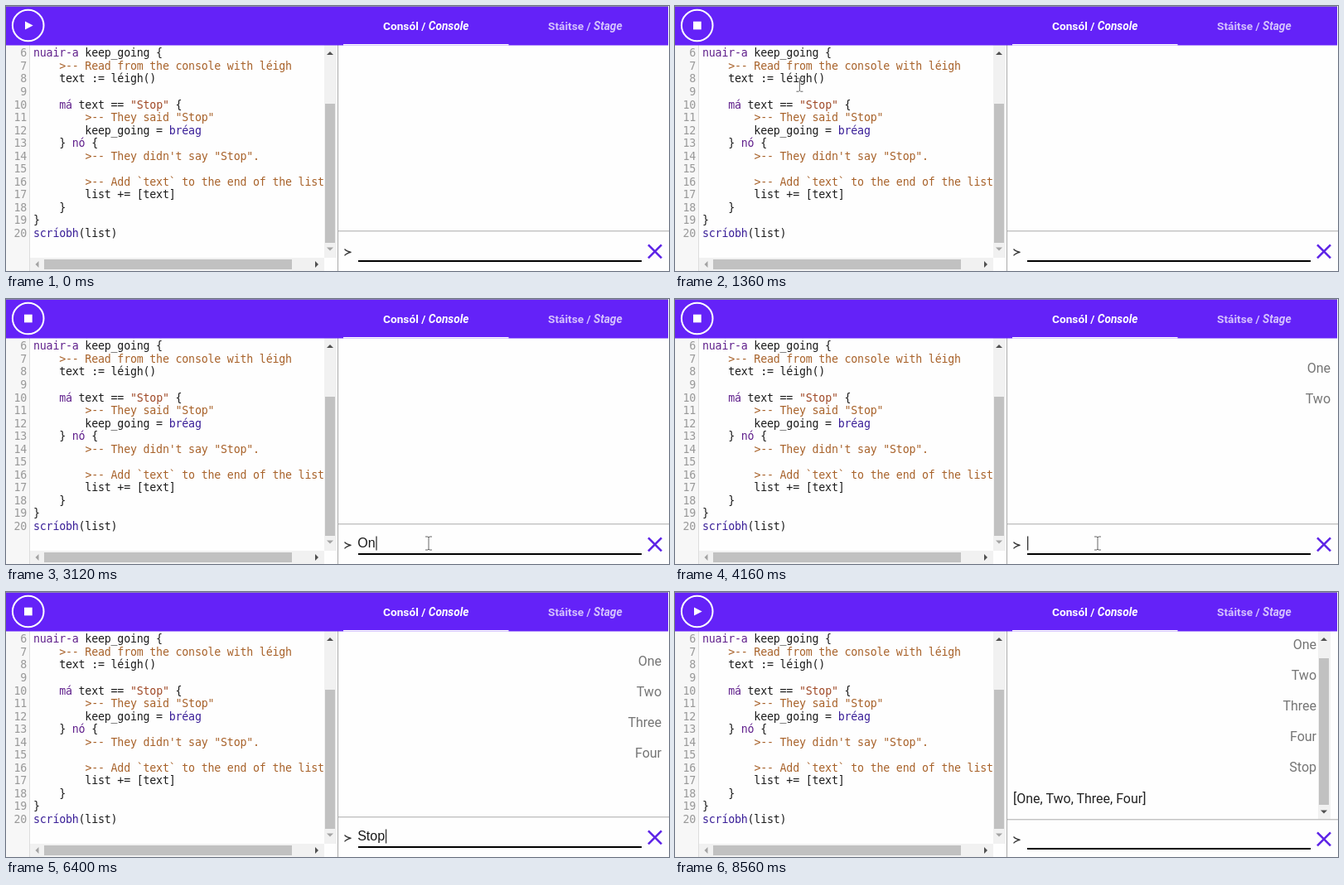
An HTML page that plays this animation: 800 px wide and 320 px high, repeating every 8720 ms.

```html
<!DOCTYPE html>
<html lang="ga">
<head>
<meta charset="utf-8">
<title>Consól</title>
<style>
  html, body { margin: 0; width: 100%; height: 100%; overflow: hidden; background: #fefefe; }
  svg { display: block; width: 800px; height: 320px; }
  text { white-space: pre; }
  .code { font: 13.3px "DejaVu Sans Mono", monospace; letter-spacing: -.21px; fill: #1c1c1c; }
  .num { fill: #999; text-anchor: end; }
  .key { fill: #60208c; }
  .com { fill: #a8622a; }
  .str { fill: #a04a28; }
  .atom { fill: #3a1f98; }
  .tab { font: 700 13.7px Roboto, sans-serif; fill: #fff; text-anchor: middle; }
  .log { font: 16px Roboto, sans-serif; fill: #757575; text-anchor: end; }
  .result { fill: #222; text-anchor: start; }
  .input { font: 16px "Liberation Sans", Arial, sans-serif; fill: #1a1a1a; }
  .track { fill: #f1f1f1; }
  .thumb { fill: #c1c1c1; }
  .dark { fill: #505050; }
  .pale { fill: #a3a3a3; }
  .italic { font-style: italic; }
  #pointer { filter: drop-shadow(0 0 1px #fff); stroke-linejoin: round; }
</style>
</head>
<body>
<svg viewBox="0 0 800 320">
  <defs>
    <clipPath id="codeArea"><rect y="47.500" width="384.500" height="256.500"/></clipPath>
    <clipPath id="logArea"><rect x="401" y="47.500" width="399" height="226.500"/></clipPath>
  </defs>
  <rect width="800" height="320" fill="#fefefe"/>

  <rect y="47" width="28" height="273" fill="#f7f7f7"/>
  <rect x="28" y="47" width="1" height="273" fill="#ddd"/>
  <g id="code" class="code" clip-path="url(#codeArea)"></g>

  <rect class="track" x="384" y="47" width="15" height="257"/>
  <rect class="thumb" x="385" y="118" width="12" height="168"/>
  <path class="dark" d="M387 59h8l-4-4z"/>
  <path class="pale" d="M387 291.500h8l-4 4z"/>
  <rect class="track" x="29" y="304" width="355" height="16"/>
  <rect class="thumb" x="46" y="306" width="299" height="12"/>
  <path class="pale" d="M39.500 308v8l-4-4z"/>
  <path class="dark" d="M373 308v8l4-4z"/>
  <rect x="400" y="47" width="1" height="273" fill="#aaa"/>

  <g id="log" clip-path="url(#logArea)"></g>
  <g id="logBar">
    <rect class="track" x="776" y="47" width="15" height="227"/>
    <rect class="thumb" x="777" y="80" width="12" height="177"/>
    <path class="dark" d="M779 59h8l-4-4z"/>
    <path class="dark" d="M779 263.500h8l-4 4z"/>
  </g>

  <rect id="border" x="401" width="399" height="1" fill="#aaa"/>
  <g id="prompt">
    <path d="M408.500 293.500Q411 296.500 416.500 297.300Q411 298.200 408.500 301.300" fill="none" stroke="#333" stroke-width="1.200"/>
    <rect x="425" y="307" width="342" height="2" fill="#000"/>
    <text id="input" class="input" x="424.200" y="300"></text>
    <rect id="caret" y="286.500" width="1.300" height="17" fill="#333"/>
    <path d="M775 288.300l16 16m0-16l-16 16" stroke="#5c22e6" stroke-width="2.500"/>
  </g>

  <rect width="799" height="47.500" fill="#6422f8"/>
  <rect width="799" height="1" fill="#8c84b0"/>
  <rect x="407" y="46" width="199.500" height="1.500" fill="#fff"/>
  <circle cx="26.700" cy="23.500" r="18.800" fill="none" stroke="#fff" stroke-width="2"/>
  <path id="icon" fill="#fff"/>
  <text class="tab" x="506.700" y="28.700">Consól / <tspan class="italic">Console</tspan></text>
  <text class="tab" x="698.800" y="28.700" opacity=".72">Stáitse / <tspan class="italic">Stage</tspan></text>

  <path id="pointer"/>
</svg>
<script>
const LOOP = 8720, STEP = 80, BLINK = 560;
const RUN = 1120, FOCUS = 2000, FINISH = 6880, POINTER_OUT = 4960;

const $ = id => document.getElementById(id);
const tag = (cls, text) => `<tspan class="${cls}">${text.replace(/>/g, '&gt;')}</tspan>`;
const key = s => tag('key', s), com = s => tag('com', s);
const str = s => tag('str', s), atom = s => tag('atom', s);

const lines = [
  key('nuair-a') + ' keep_going {',
  '    ' + com('>-- Read from the console with léigh'),
  '    text := léigh()',
  '',
  '    ' + key('má') + ' text == ' + str('"Stop"') + ' {',
  '        ' + com('>-- They said "Stop"'),
  '        keep_going = ' + atom('bréag'),
  '    } ' + key('nó') + ' {',
  '        ' + com('>-- They didn\'t say "Stop".'),
  '',
  '        ' + com('>-- Add `text` to the end of the list'),
  '        list += [text]',
  '    }',
  '}',
  atom('scríobh') + '(list)'
];
$('code').innerHTML = lines.map((line, i) => {
  const y = 61.4 + i * 15.53;
  return `<text class="num" x="25" y="${y}">${i + 6}</text><text x="33" y="${y}">${line}</text>`;
}).join('');

// Each word: the times its letters appear, then the time it is entered.
const words = [
  { text: 'One', keys: [2960, 3120, 3280], enter: 3440 },
  { text: 'Two', keys: [3680, 3760, 3920], enter: 4160 },
  { text: 'Three', keys: [4240, 4400, 4480, 4560, 4640], enter: 4880 },
  { text: 'Four', keys: [5280, 5360, 5440, 5520], enter: 5760 },
  { text: 'Stop', keys: [6000, 6240, 6320, 6400], enter: 6800 }
];
const caretResets = [FOCUS, ...words.flatMap(w => [...w.keys, w.enter]), FINISH];

$('log').innerHTML = words.map(w => `<text class="log">${w.text}</text>`).join('') +
  '<text class="log result" x="408" y="254.500">[One, Two, Three, Four]</text>';
const logRows = [...$('log').children];

const path = [
  [560, 120, 170], [880, 40, 47.5], [960, 30, 30], [RUN, 27, 26],
  [1840, 503, 293], [2160, 503, 293], [2320, 510, 295]
];
const shapes = {
  beam: 'M-4-8h3l1 1 1-1h3M0-7V7M-4 8h3l1-1 1 1h3',
  arrow: 'M0 0v15l3.500-3.300 2.500 5.500 2.400-1-2.500-5.400h4.800z',
  hand: 'M-1.500 0q1.500-1.500 3 0v6l6 1.500q1.500.5 1 3l-1 5.500h-7l-5-6q0-2 3-.5z'
};

function pointerAt(t) {
  const last = path[path.length - 1];
  if (t >= last[0]) return last.slice(1);
  const i = Math.max(1, path.findIndex(p => p[0] >= t));
  const [t0, x0, y0] = path[i - 1], [t1, x1, y1] = path[i];
  const u = (t - t0) / (t1 - t0), k = u * u * (3 - 2 * u);
  return [x0 + (x1 - x0) * k, y0 + (y1 - y0) * k];
}

function pointerKind(x, y) {
  if (Math.hypot(x - 27, y - 23.5) < 20) return 'hand';
  const inEditor = y > 47 && y < 304 && x > 29 && x < 384;
  const inInput = y > 280 && x > 425 && x < 767;
  return inEditor || inInput ? 'beam' : 'arrow';
}

const show = (el, on) => el.setAttribute('visibility', on ? 'visible' : 'hidden');

function drawPointer(t) {
  const el = $('pointer'), visible = t >= path[0][0] && t < POINTER_OUT;
  show(el, visible);
  if (!visible) return;
  const [x, y] = pointerAt(t), kind = pointerKind(x, y), beam = kind === 'beam';
  el.setAttribute('d', shapes[kind]);
  el.setAttribute('transform', `translate(${x} ${y})`);
  el.setAttribute('fill', beam ? 'none' : kind === 'hand' ? '#fff' : '#111');
  el.setAttribute('stroke', beam ? '#666' : kind === 'hand' ? '#222' : '#fff');
}

function drawConsole(t) {
  const done = t >= FINISH;
  logRows.forEach((row, i) => {
    const word = words[i];
    show(row, word ? t >= word.enter : done);
    if (!word) return;
    row.setAttribute('x', done ? 774 : 791);
    row.setAttribute('y', (done ? 69.3 : 89.3) + i * 36.8);
  });
  show($('logBar'), done);
  $('border').setAttribute('y', done ? 274.3 : 271.3);
  $('prompt').setAttribute('transform', `translate(0 ${done ? 2 : 0})`);

  const current = words.find(w => t >= w.keys[0] && t < w.enter);
  $('input').textContent = current
    ? current.text.slice(0, current.keys.filter(k => k <= t).length) : '';
  const width = current ? $('input').getComputedTextLength() : 0;
  $('caret').setAttribute('x', 425 + width);
  const reset = caretResets.filter(k => k <= t).pop();
  show($('caret'), t >= FOCUS && Math.floor((t - reset) / BLINK) % 2 === 0);
}

function render(now) {
  const t = Math.floor((now % LOOP) / STEP) * STEP;
  const running = t >= RUN && t < FINISH;
  $('icon').setAttribute('d', running ? 'M22 18.700h9.700v9.700h-9.700z' : 'M23 18.500v10l9.700-5z');
  drawConsole(t);
  drawPointer(t);
}

const start = performance.now();
function tick() {
  render(performance.now() - start);
  requestAnimationFrame(tick);
}
tick();
</script>
</body>
</html>
```
